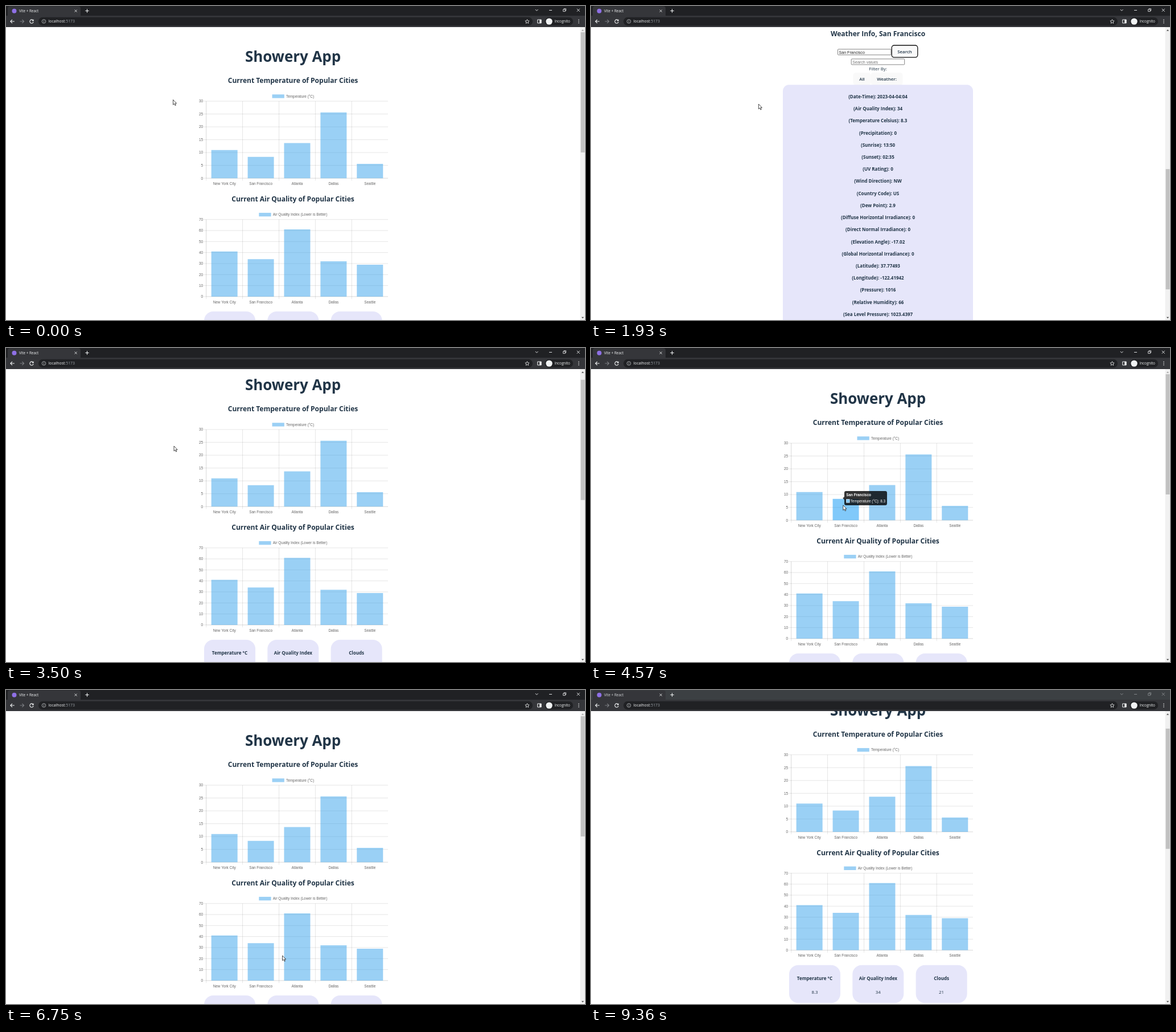
Write an HTML page with a canvas that moves like this. It is 1017 px wide and 551 px high and loops after 9.43 s.

```html
<!DOCTYPE html>
<html lang="en">
<head>
<meta charset="utf-8">
<title>Showery App</title>
<style>
html, body { margin: 0; width: 100%; height: 100%; overflow: hidden; background: #fff; }
canvas { display: block; }
</style>
</head>
<body>
<canvas id="stage" width="1017" height="551"></canvas>
<script>
const ctx = document.getElementById('stage').getContext('2d');
const LOOP = 9430, BLUR_AT = 9360, MAX_SCROLL = 697, MID = 504;
const INK = '#213547', LAVENDER = '#e6e6fa';
const UI = '"Open Sans", "Noto Sans", sans-serif';
const PLAIN = '"Liberation Sans", Arial, sans-serif';

const clamp = v => Math.max(0, Math.min(1, v));
const ramp = (t, from, to) => clamp((t - from) / (to - from));
const smooth = v => v * v * (3 - 2 * v);
const easeOut = (v, power) => 1 - (1 - clamp(v)) ** power;

// Down to the end, flung back to the top, then one wheel click
const scrollAt = t =>
  MAX_SCROLL * (ramp(t, 884, 2130) - easeOut(ramp(t, 2540, 3964), 3)) + 53.3 * ramp(t, 7550, 7750);

// Where the pointer rests or turns: [time, x, y]
const stops = [
  [0, 293.5, 164.5], [360, 293.5, 165], [800, 294, 172], [3700, 295, 172], [4080, 362, 262],
  [4530, 442, 276], [5500, 600, 250], [5850, 628, 440], [6500, 485.5, 466], [6880, 485.5, 466],
  [7320, 624, 466], [7800, 450, 476], [8250, 390, 432], [8950, 410, 552]
];
function mouseAt(t) {
  let [, x, y] = stops[0];
  stops.slice(1).forEach(([end, nx, ny], i) => {
    const k = smooth(ramp(t, stops[i][0], end));
    x += (nx - x) * k;
    y += (ny - y) * k;
  });
  return { x, y };
}

const LEFT = 351.7, HEIGHT = 135.2, SLOT = 63.9, BAR = 46;
const cities = ['New York City', 'San Francisco', 'Atlanta', 'Dallas', 'Seattle'];
const charts = [
  {
    title: 'Current Temperature of Popular Cities', label: 'Temperature (°C)',
    top: 167, max: 30, step: 5, values: [11, 8.3, 13.7, 25.6, 5.6]
  },
  {
    title: 'Current Air Quality of Popular Cities', label: 'Air Quality Index (Lower is Better)',
    top: 374.7, max: 70, step: 10, values: [41, 34, 61, 32, 29]
  }
];

const cards = [['Temperature °C', '8.3'], ['Air Quality Index', '34'], ['Clouds', '21']];
const rows = [
  'Date-Time): 2023-04-04:04', 'Air Quality Index): 34', 'Temperature Celsius): 8.3',
  'Precipitation): 0', 'Sunrise): 13:50', 'Sunset): 02:35', 'UV Rating): 0',
  'Wind Direction): NW', 'Country Code): US', 'Dew Point): 2.9',
  'Diffuse Horizontal Irradiance): 0', 'Direct Normal Irradiance): 0',
  'Elevation Angle): -17.02', 'Global Horizontal Irradiance): 0', 'Latitude): 37.77493',
  'Longitude): -122.41942', 'Pressure): 1016', 'Relative Humidity): 66',
  'Sea Level Pressure): 1023.4397', 'Snow): 0', 'Solar Radiation): 0',
  'Visibility): 16', 'Wind Speed): 3.1'
];

const barX = i => LEFT + SLOT * (i + 0.5);
const barTop = (c, i) => c.top + HEIGHT * (1 - c.values[i] / c.max);
const tipText = (c, i) => `${c.label}: ${c.values[i]}`;

// Index of the bar under the pointer, or -1
function barUnder(c, t) {
  const { x, y } = mouseAt(t), pageY = y + scrollAt(t);
  return c.values.findIndex((v, i) =>
    Math.abs(x - barX(i)) < BAR / 2 && pageY > barTop(c, i) && pageY < c.top + HEIGHT);
}

// Every change of the hovered bar over one loop
function findHovers(c) {
  const hovers = [{ start: 0, bar: -1 }];
  for (let t = 0; t < LOOP; t += 5) {
    const bar = barUnder(c, t);
    if (bar !== hovers[hovers.length - 1].bar) hovers.push({ start: t, bar });
  }
  return hovers;
}
charts.forEach(c => c.hovers = findHovers(c));

function rect(x, y, w, h, fill, r = 0) {
  ctx.fillStyle = fill;
  ctx.beginPath();
  ctx.roundRect(x, y, w, h, r);
  ctx.fill();
}

function frame(x, y, w, h, color, width, r = 0) {
  ctx.strokeStyle = color;
  ctx.lineWidth = width;
  ctx.beginPath();
  ctx.roundRect(x, y, w, h, r);
  ctx.stroke();
}

function dot(x, y, r, fill) {
  ctx.fillStyle = fill;
  ctx.beginPath();
  ctx.arc(x, y, r, 0, 7);
  ctx.fill();
}

function stroke(path, color, width = 1) {
  ctx.strokeStyle = color;
  ctx.lineWidth = width;
  ctx.stroke(new Path2D(path));
}

function fill(path, color) {
  ctx.fillStyle = color;
  ctx.fill(new Path2D(path));
}

// y is the middle of the capitals
function text(s, x, y, size, { color = INK, weight = 400, align = 'center', font = UI } = {}) {
  ctx.font = `${weight} ${size}px ${font}`;
  ctx.fillStyle = color;
  ctx.textAlign = align;
  ctx.fillText(s, x, y + size * 0.36);
}
const bold = (s, x, y, size) => text(s, x, y, size, { weight: 700 });
const small = (s, x, y, align, color = '#666', weight = 400) =>
  text(s, x, y, 6.4, { color, align, weight, font: PLAIN });

function measure(s) {
  ctx.font = `6.4px ${PLAIN}`;
  return ctx.measureText(s).width;
}

function tipTarget(c, i) {
  const width = measure(tipText(c, i)) + 13.5, onRight = barX(i) > MID;
  return { x: onRight ? barX(i) - 3.7 - width : barX(i) + 3.7, y: barTop(c, i), width, onRight, bar: i };
}

// Replays the hover changes up to time t
function hoverState(c, t) {
  const glow = c.values.map(() => 0);
  let tip = null, alpha = 0;
  c.hovers.forEach(({ start, bar }, n) => {
    if (start > t) return;
    const next = c.hovers[n + 1];
    const span = Math.min(t, next ? next.start : LOOP) - start, k = easeOut(span / 400, 4);
    glow.forEach((g, i) => glow[i] += ((i === bar) - g) * k);
    alpha = clamp(alpha + (bar < 0 ? -span : span) / 200);
    if (bar < 0) return;
    const goal = tipTarget(c, bar), from = tip || goal;
    tip = { ...goal, x: from.x + (goal.x - from.x) * k, y: from.y + (goal.y - from.y) * k };
  });
  return { glow, tip, alpha };
}

function drawTip(c, { x, y, width, onRight, bar }, alpha) {
  const top = y - 12.6, edge = onRight ? x + width : x, peak = edge + (onRight ? 2.7 : -2.7);
  ctx.globalAlpha = alpha;
  rect(x, top, width, 25, 'rgba(0,0,0,.8)', 3.2);
  fill(`M${edge} ${y - 2.7}L${peak} ${y}L${edge} ${y + 2.7}Z`, 'rgba(0,0,0,.8)');
  small(cities[bar], x + 3.2, top + 7, 'left', '#fff', 700);
  rect(x + 3.2, top + 14.2, 6.4, 6.4, '#fff');
  rect(x + 3.7, top + 14.7, 5.4, 5.4, '#86cafa');
  small(tipText(c, bar), x + 10.7, top + 17.5, 'left', '#fff');
  ctx.globalAlpha = 1;
}

function drawChart(c, t) {
  const bottom = c.top + HEIGHT, grid = 'rgba(0,0,0,.1)', { glow, tip, alpha } = hoverState(c, t);
  bold(c.title, MID, c.top - 36, 12);

  const x = 504.3 - (measure(c.label) + 24.5) / 2;
  rect(x, c.top - 11.8, 21.3, 6.4, '#9bd0f5');
  small(c.label, x + 24.5, c.top - 8.8, 'left');

  for (let v = 0; v <= c.max; v += c.step) {
    const y = bottom - HEIGHT * v / c.max;
    stroke(`M347.2 ${y}H671`, grid);
    small(v, 346, y, 'right');
  }
  stroke(`M${LEFT} ${c.top}V${bottom}H671`, grid, 0.6);

  c.values.forEach((v, i) => {
    const top = barTop(c, i), g = glow[i];
    stroke(`M${LEFT + SLOT * i} ${c.top}V${bottom + 4.3}`, grid);
    rect(barX(i) - BAR / 2, top, BAR, bottom - top, `rgba(${54 - 54 * g},${162 - 17 * g},${235 + 12 * g},.5)`);
    small(cities[i], barX(i), bottom + 9.4, 'center');
  });
  if (tip && alpha) drawTip(c, tip, alpha);
}

function drawInput(s, x, y, color) {
  frame(x, y, 93.5, 10, '#767676', 0.9, 1);
  text(s, x + 2, y + 5.2, 7.1, { align: 'left', color, font: PLAIN });
}

function drawButton(s, x, y, w) {
  rect(x, y, w, 21.5, '#f9f9f9', 4.4);
  text(s, x + w / 2, y + 11.3, 7.9, { weight: 600 });
}

function drawPage(t, scroll) {
  ctx.save();
  ctx.translate(0, -scroll);
  bold('Showery App', MID, 88.8, 25.9);
  charts.forEach(c => drawChart(c, t));

  cards.forEach(([name, value], i) => {
    const x = 348 + 111.3 * i;
    rect(x, 536, 90, 66.5, LAVENDER, 16);
    bold(name, x + 45, 559.2, 8);
    text(value, x + 45, 583, 7.9);
  });

  bold('Weather Info, San Francisco', MID, 634.5, 12);
  drawInput('San Francisco', 433.5, 661.5, '#222');
  drawButton('Search', 528, 654.5, 46);
  frame(528.2, 654.7, 45.6, 21.2, '#101010', 1.3, 4.4);
  drawInput('Search values', 457.2, 678.6, '#757575');
  text('Filter By:', MID, 696, 7.9);
  drawButton('All', 460.5, 702.8, 31);
  drawButton('Weather:', 491.5, 702.8, 56);

  rect(337, 724, 334, 507, LAVENDER, 10.7);
  rows.forEach((row, i) => bold('(' + row, MID, 744.7 + 21.22 * i, 8));
  ctx.restore();
}

function drawScrollbar(scroll) {
  const arrow = (y, dy, live) =>
    fill(`M1010.8 ${y}l2.2 ${dy}l2.2 ${-dy}z`, live ? '#505050' : '#a3a3a3');
  rect(1008.5, 37, 8.5, 514, '#f1f1f1');
  rect(1009.5, 46 + scroll * 0.41, 7, 211, '#c1c1c1');
  arrow(43.8, -2.6, scroll > 0);
  arrow(545.7, 2.6, scroll < MAX_SCROLL);
}

function drawBrowser(blurred) {
  const white = '#f1f3f4', control = blurred ? '#8b8e91' : white;
  const label = (s, x, y, size, color = white) => text(s, x, y, size, { align: 'left', color });

  rect(0, 0, 1017, 17, blurred ? '#3c4043' : '#202124');
  rect(3, 0.5, 128, 20, '#35363a', 4);
  rect(0, 17, 1017, 20, '#35363a');
  dot(14.5, 8.7, 4, '#8f70e6');
  label('Vite + React', 23, 8.5, 6.3, blurred ? '#d5d7da' : white);
  stroke('M120.6 6.6l4 4m0 -4l-4 4', white, 0.9);
  stroke('M139.3 8.5h6.4M142.5 5.3v6.4', white, 1.1);
  stroke('M929.8 6l2.4 2.4l2.4 -2.4', control, 0.9);
  stroke('M954 7.5h5M1002.8 4.8l5 5m0 -5l-5 5', control, 0.9);
  stroke('M978.6 6h3.6v3.6h-3.6zM980 6v-1.3h3.6v3.6h-1.3', control, 0.8);

  stroke('M14.8 27H8M11 23.8L7.8 27l3.2 3.2', white, 1.1);
  stroke('M24.5 27H31.5M28.4 23.8l3.2 3.2l-3.2 3.2', '#7d7f83', 1.1);
  stroke('M47.6 25.1A3.2 3.2 0 1 0 48.2 27.8', white, 1.1);
  fill('M48.6 23.2v3.3h-3.3z', white);
  rect(57, 19.8, 868, 14.6, '#202124', 7.3);
  stroke('M69.8 27A3.3 3.3 0 1 1 63.2 27A3.3 3.3 0 1 1 69.8 27M66.5 26.5v2.3M66.5 24.8v.9', '#c4c7ca', 0.8);
  label('localhost', 74.5, 27, 6.9);
  label(':5173', 74.5 + ctx.measureText('localhost').width, 27, 6.9, '#9aa0a6');
  stroke('M915.5 23.6l1.1 2.3l2.5 .3l-1.9 1.7l.5 2.5l-2.2 -1.3l-2.2 1.3l.5 -2.5l-1.9 -1.7l2.5 -.3z', white, 0.8);
  frame(933.7, 24, 6.4, 6, white, 1);
  rect(937.2, 24, 3, 6, white);
  rect(946.5, 20, 49.5, 14.2, '#202124', 7.1);
  dot(954, 27.1, 5.7, white);
  label('Incognito', 963.5, 27, 6.3);
  for (let i = -1; i < 2; i++) dot(1006, 27 + 2.7 * i, 0.8, white);
}

function drawMouse({ x, y }) {
  const arrow = `M${x} ${y}v8.8l2 -1.9l1.5 3.2l1.4 -.6l-1.4 -3.1h2.6z`;
  fill(arrow, '#fff');
  stroke(arrow, '#111', 0.75);
}

function draw(now) {
  const t = now % LOOP, scroll = scrollAt(t);
  rect(0, 0, 1017, 551, '#fff');
  drawPage(t, scroll);
  drawScrollbar(scroll);
  drawBrowser(t >= BLUR_AT);
  drawMouse(mouseAt(t));
  requestAnimationFrame(draw);
}
requestAnimationFrame(draw);
</script>
</body>
</html>
```
